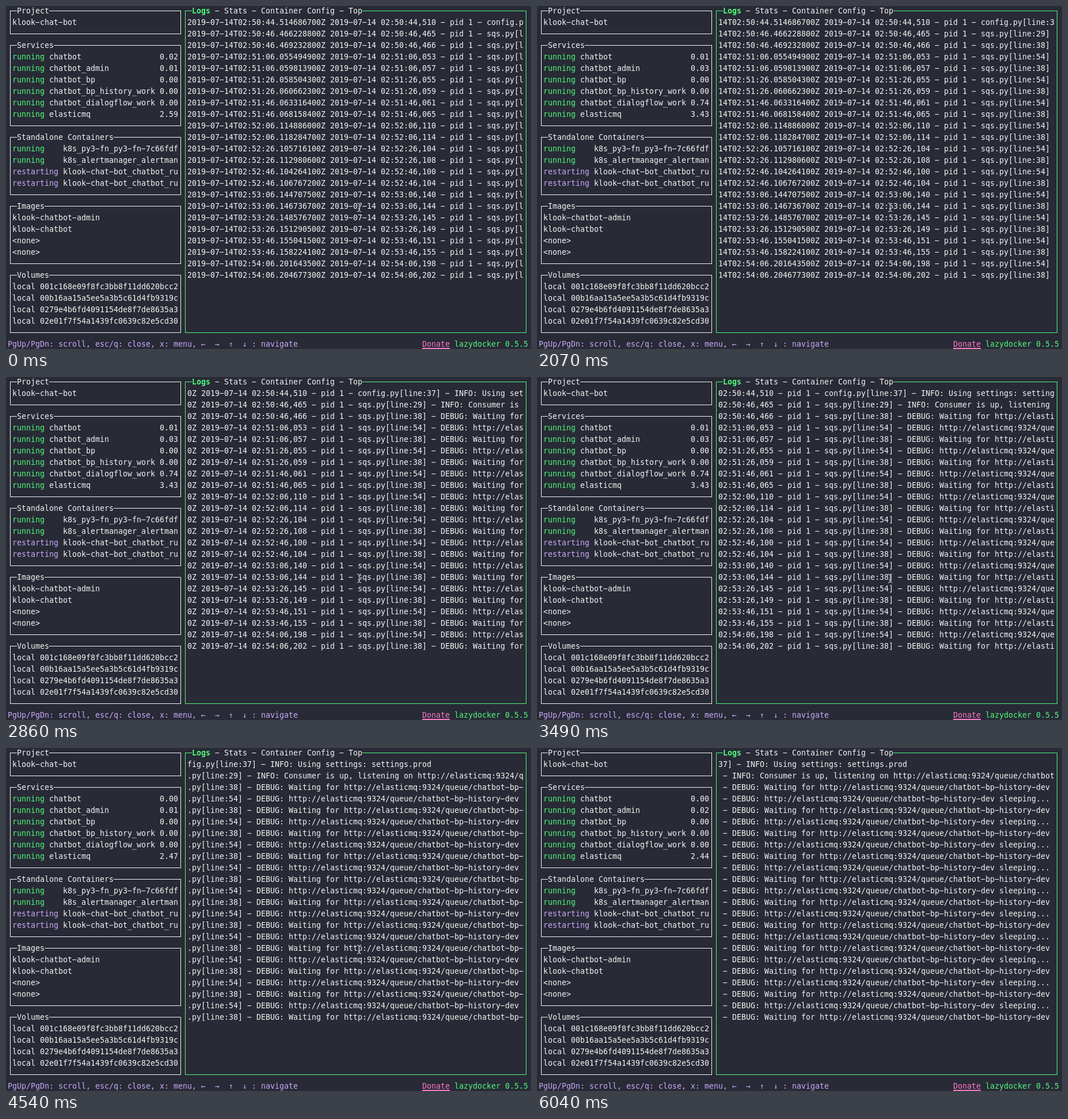
Write an HTML page with a canvas that moves like this. It is 912 px wide and 597 px high and loops after 6.62 s.

```html
<!DOCTYPE html>
<html lang="en">
<head>
<meta charset="utf-8">
<title>Terminal dashboard</title>
<style>
  html, body { margin: 0; width: 100%; height: 100%; overflow: hidden; background: #282a36; }
  canvas { display: block; }
</style>
</head>
<body>
<canvas id="stage" width="912" height="597"></canvas>
<script>
const ctx = document.getElementById('stage').getContext('2d');
const LOOP = 6620;
const CELL = 8, ROW = 20, LEFT = 3, BASE = 13;
const FONT = '13.288px "DejaVu Sans Mono", "Liberation Mono", monospace';
const BG = '#282a36', FG = '#f4f4f0', GREEN = '#50fa7b', PURPLE = '#caa9fa', PINK = '#ff79c6';

// CPU load in hundredths, one value per refresh; services without a list are idle
const REFRESH = [480, 1950, 3820, 4640, 5680];
const SERVICES = [
  ['chatbot', [2, 0, 1, 0, 3, 0]],
  ['chatbot_admin', [1, 2, 3, 1, 2, 2]],
  ['chatbot_bp', []],
  ['chatbot_bp_history_work', []],
  ['chatbot_dialogflow_work', [0, 0, 74]],
  ['elasticmq', [259, 247, 343, 247, 285, 244]]
];
const CONTAINERS = ['k8s_py3-fn_py3-fn-7c66fdf', 'k8s_alertmanager_alertman',
  'klook-chat-bot_chatbot_ru', 'klook-chat-bot_chatbot_ru'];
const IMAGES = ['klook-chatbot-admin', 'klook-chatbot', '<none>', '<none>'];
const VOLUMES = ['001c168e09f8fc3bb8f11dd620bcc2', '00b16aa15a5ee5a3b5c61d4fb9319c',
  '0279e4b6fd4091154de8f7de8635a3', '02e01f7f54a1439fc0639c82e5cd30'];

const QUEUE = 'http://elasticmq:9324/queue/chatbot-bp-history-dev';
const POLLS = [53, 55, 61, 110, 104, 100, 140, 145, 151, 198];

const random = seed => {
  const v = Math.sin(seed * 12.9898) * 43758.5453;
  return v - Math.floor(v);
};
const pad = (n, width) => String(n).padStart(width, '0');
const countPassed = (times, t) => times.filter(at => at <= t).length;

const LOGS = [];

function log(sec, ms, source, message) {
  const clock = `02:${50 + Math.floor(sec / 60)}:${pad(sec % 60, 2)}`;
  const micros = Math.floor((ms + 1 + 4 * random(LOGS.length + 1)) * 1e4);
  LOGS.push(`2019-07-14T${clock}.${pad(micros, 7)}00Z 2019-07-14 ${clock},${pad(ms, 3)}` +
    ` - pid 1 - ${source} - ${message}`);
}

const logWait = (sec, ms) => log(sec, ms, 'sqs.py[line:38]', `DEBUG: Waiting for ${QUEUE}`);

log(44, 510, 'config.py[line:37]', 'INFO: Using settings: settings.prod');
log(46, 465, 'sqs.py[line:29]', `INFO: Consumer is up, listening on ${QUEUE}`);
logWait(46, 466);
POLLS.forEach((ms, i) => {
  const sec = 66 + 20 * i;
  log(sec, ms, 'sqs.py[line:54]', `DEBUG: ${QUEUE} sleeping...`);
  logWait(sec, ms + 4);
});

// Every key tap moves the logs two columns; a held key repeats between redraws.
const TAPS = [1260, 1440, 1560, 4930, 5050, 5170, 5380];
const HOLD = { start: 2032, redraw: 118, redraws: 23, repeats: 1.41 };

function scrollColumn(t) {
  let presses = countPassed(TAPS, t);
  if (t >= HOLD.start) {
    const n = Math.min(HOLD.redraws, Math.floor((t - HOLD.start) / HOLD.redraw));
    presses += 1 + Math.round(n * HOLD.repeats);
  }
  return 2 * presses;
}

// One glyph per terminal cell; the terminal's wide hyphen is drawn as a minus.
function text(str, col, row, color = FG, weight = '') {
  ctx.font = `${weight} ${FONT}`;
  ctx.fillStyle = color;
  [...str.replace(/-/g, '\u2212')].forEach((ch, i) => {
    if (ch !== ' ') ctx.fillText(ch, LEFT + (col + i) * CELL, BASE + row * ROW);
  });
}

function panel(c0, r0, c1, r1, titleLength, color = FG) {
  const x0 = LEFT + c0 * CELL + 4, x1 = LEFT + c1 * CELL + 4;
  const y0 = r0 * ROW + 8, y1 = r1 * ROW + 8;
  const tx = LEFT + (c0 + 2) * CELL, tEnd = tx + titleLength * CELL;
  ctx.fillStyle = color;
  ctx.fillRect(x0, y0, tx - x0, 1);
  ctx.fillRect(tEnd, y0, x1 - tEnd + 1, 1);
  ctx.fillRect(x0, y1, x1 - x0 + 1, 1);
  ctx.fillRect(x0, y0, 1, y1 - y0);
  ctx.fillRect(x1, y0, 1, y1 - y0);
}

function sidePanel(r0, r1, title) {
  panel(0, r0, 37, r1, title.length);
  text(title, 2, r0);
}

function beam(x, y) {
  ctx.beginPath();
  for (const s of [-1, 1]) {
    ctx.moveTo(x - 3.5, y + 7.5 * s);
    ctx.quadraticCurveTo(x, y + 7.5 * s, x, y + 4.5 * s);
    ctx.quadraticCurveTo(x, y + 7.5 * s, x + 3.5, y + 7.5 * s);
  }
  ctx.moveTo(x, y - 5);
  ctx.lineTo(x, y + 5);
  ctx.moveTo(x - 2, y + 2.5);
  ctx.lineTo(x + 2, y + 2.5);
  ctx.strokeStyle = BG;
  ctx.lineWidth = 2.5;
  ctx.stroke();
  ctx.strokeStyle = FG;
  ctx.lineWidth = 1;
  ctx.stroke();
}

// The pointer rests, then speeds up towards the lower right and leaves.
function pointer(t) {
  if (t >= 6040) return;
  const k = t < 5590 ? 0 : (Math.floor((t - 5590) / 90) + 1) / 5;
  beam(613.5 + 217 * k * k, 350.5 + 187 * k * k);
}

function draw(t) {
  ctx.fillStyle = BG;
  ctx.fillRect(0, 0, 912, 597);

  sidePanel(0, 2, 'Project');
  text('klook-chat-bot', 1, 1);

  sidePanel(3, 10, 'Services');
  const refresh = countPassed(REFRESH, t);
  SERVICES.forEach(([name, load], i) => {
    text('running', 1, 4 + i, GREEN);
    text(name, 9, 4 + i);
    text(((load[refresh] || 0) / 100).toFixed(2), 33, 4 + i);
  });

  sidePanel(11, 16, 'Standalone Containers');
  CONTAINERS.forEach((name, i) => {
    const up = i < 2 || (i === 2 && refresh === 1);
    text(up ? 'running' : 'restarting', 1, 12 + i, up ? GREEN : PURPLE);
    text(name, 12, 12 + i);
  });

  sidePanel(17, 22, 'Images');
  IMAGES.forEach((name, i) => text(name, 1, 18 + i));

  sidePanel(23, 28, 'Volumes');
  VOLUMES.forEach((id, i) => text('local ' + id, 1, 24 + i));

  const tabs = ' - Stats - Container Config - Top';
  panel(38, 0, 112, 28, 4 + tabs.length, GREEN);
  text('Logs', 40, 0, GREEN, 'bold');
  text(tabs, 44, 0);
  const first = scrollColumn(t);
  LOGS.forEach((line, i) => text(line.slice(first, first + 73), 39, 1 + i));

  text('PgUp/PgDn: scroll, esc/q: close, x: menu, ←  →  ↑  ↓ : navigate', 0, 29, PURPLE);
  text('Donate', 90, 29, PINK);
  ctx.fillRect(LEFT + 90 * CELL, 595, 6 * CELL, 2);
  text('lazydocker 0.5.5', 97, 29, GREEN);

  pointer(t);
}

const start = performance.now();
function tick() {
  draw((performance.now() - start) % LOOP);
  requestAnimationFrame(tick);
}
tick();
</script>
</body>
</html>
```
